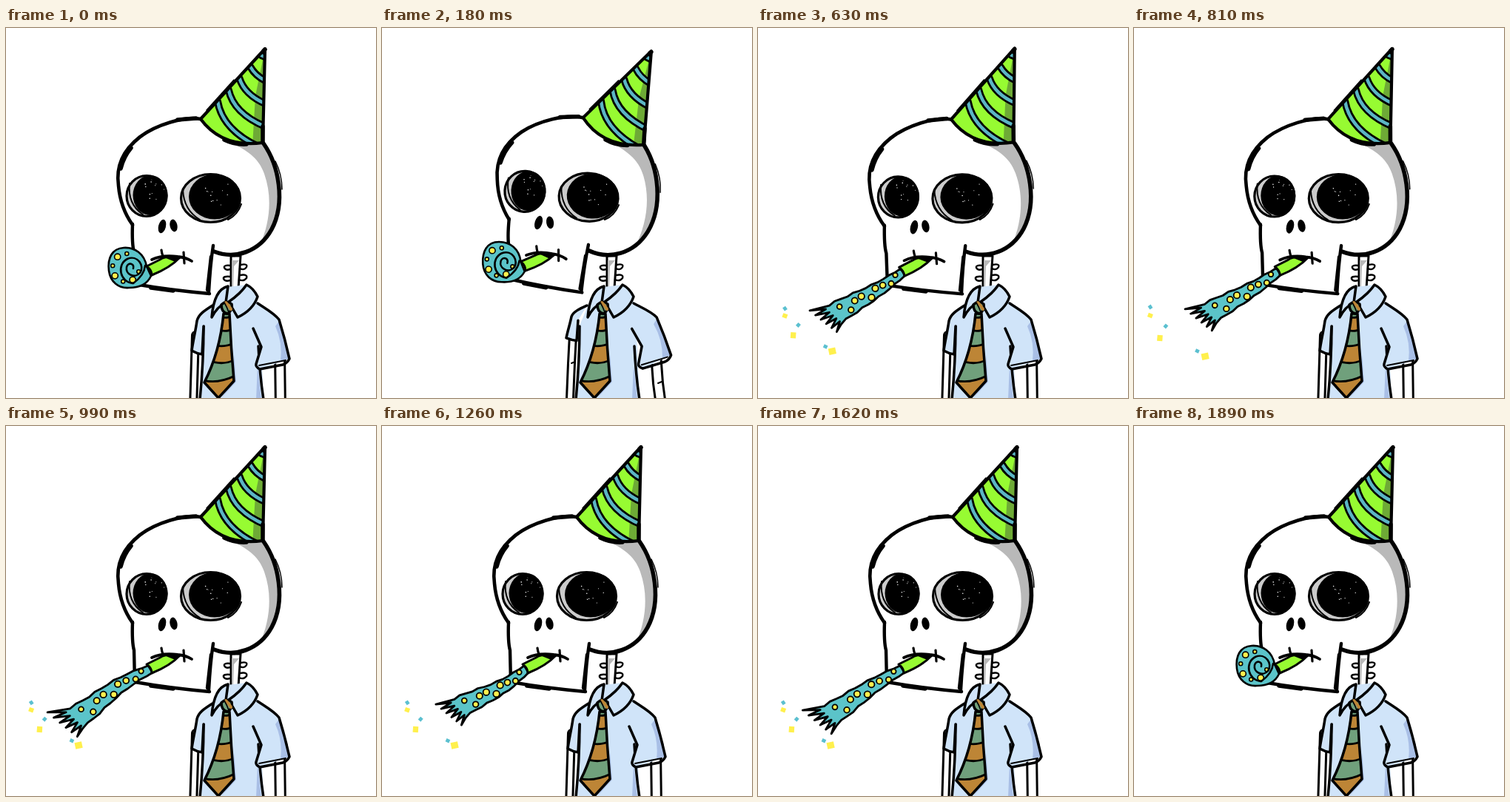
These frames come from a looping animation (500x500 px, 3.06 s). An HTML page:

```html
<!DOCTYPE html>
<html lang="en">
<head>
<meta charset="utf-8">
<title>Party skeleton</title>
<style>
  html, body { margin: 0; width: 100%; height: 100%; overflow: hidden; background: #fff; }
  svg { display: block; width: 100vw; height: 100vh; }
  .ink { fill: none; stroke: #000; stroke-linecap: round; stroke-linejoin: round; }
  .shirt { fill: #d0e4f9; } .shade { fill: #a9bfe6; stroke: none; }
  .bone { fill: #fff; } .gray { fill: #b9b9b9; stroke: none; }
  .green { fill: #97fb32; } .teal { fill: #5bc4c9; } .dot { fill: #fff04d; }
  #sleeveL path { vector-effect: non-scaling-stroke; }
</style>
</head>
<body>
<svg viewBox="0 0 500 500">
  <defs>
    <clipPath id="hatClip"><path id="hatShape" d="M350 28 L263 123 C277 142 302 161 347 155 Z"/></clipPath>
    <clipPath id="tieClip"><path id="tieShape" d="M294 386 Q289 438 268 479 L287 500 L308 477 Q304 432 302 386 Z"/></clipPath>
    <clipPath id="skullClip"><path id="skullShape" d="M263 123 C240 119 203 131 181 147 C154 168 149 192 152 213 C154 236 161 252 171 266 L174 346 L274 359 L280 302 C309 313 342 303 359 272 C378 236 369 186 348 156 Z"/></clipPath>
  </defs>

  <g class="ink" stroke-width="3">
    <path class="bone" d="M304 308 L304 352 L314 352 L317 308 Z"/>
    <path class="gray" d="M305 314 H315 L308 322 L307 350 H305 Z"/>
    <path stroke-width="2.4" d="M317 320 q10 -2 8 3 q-3 5 -9 2 M316 334 q11 -2 9 4 q-4 5 -10 2 M303 321 q-9 -1 -8 3 q2 4 8 2 M303 336 q-10 -1 -9 3 q2 4 9 2"/>
  </g>

  <g class="ink" stroke-width="3.5">
    <g id="armL"></g>
    <g id="armR"></g>
    <path class="shirt" stroke="none" d="M299 350 L278 376 L267 402 L262 502 H348 L345 432 L341 372 L325 347 Z"/>
    <path class="shade" d="M340 456 L345 502 H338 Z M308 440 L311 478 L291 500 L307 476 Z"/>
    <path d="M267 403 Q267 452 262 502 M341 430 Q343 470 348 502"/>
    <g id="sleeveL">
      <path class="shirt" d="M279 375 C268 382 260 387 258 396 C256 410 253 422 251 436 Q258 440 265 441 L267 403"/>
    </g>
    <g id="sleeveR">
      <path class="shirt" stroke="none" d="M340 372 L369 394 L383 447 L343 461 L338 454 L345 431 L334 406"/>
      <path class="shade" d="M369 396 L383 447 L371 450 Q374 425 364 403 Z"/>
      <path d="M340 372 C352 380 363 386 369 394 Q377 420 383 447 Q380 453 374 455 L343 461 Q337 458 338 454 L345 431 L334 406"/>
      <path stroke-width="2" d="M342 456 L378 449"/>
    </g>
    <g clip-path="url(#tieClip)">
      <path d="M260 380 H315 V502 H260 Z" fill="#70a07c" stroke="none"/>
      <g fill="#bd8536" stroke-width="2.8">
        <path d="M285 389 Q299 395 310 386 V404 Q299 413 285 407 Z"/>
        <path d="M275 427 Q294 434 312 424 V447 Q292 458 272 448 Z"/>
        <path d="M260 474 Q285 484 315 467 V504 H260 Z"/>
      </g>
    </g>
    <use href="#tieShape"/>
    <path class="shirt" d="M300 349 C287 352 280 366 278 391 Q285 377 297 371 Z"/>
    <path class="shirt" d="M301 370 L313 391 Q334 381 340 363 Q334 351 325 347 Q317 359 301 370 Z"/>
    <path fill="#70a07c" d="M291 374 Q298 367 305 373 Q307 382 299 386 Q291 384 291 374 Z"/>
    <path d="M297 371 Q302 376 304 380" stroke="#bd8536" stroke-width="4"/>
    <path d="M295 371 Q299 378 301 384" stroke-width="1.6"/>
  </g>

  <g id="head" class="ink">
    <use href="#skullShape" fill="#fff" stroke="none"/>
    <path class="gray" clip-path="url(#skullClip)" d="M296 151 C324 164 341 174 349 197 C360 228 357 262 343 294 L374 278 L382 190 L350 150 Z"/>
    <path stroke-width="4.6" d="M263 123 C240 119 203 131 181 147 C154 168 149 192 152 213 C154 236 161 252 171 266"/>
    <path stroke-width="5.6" d="M348 156 C369 186 378 236 359 272 C342 303 309 313 281 302"/>
    <path stroke-width="4.4" d="M171 265 Q170 292 173 303 L174 346 Q220 354 275 359"/>
    <path stroke-width="4.4" d="M280 294 Q276 320 274 357 M277 309 L272 354"/>
    <path stroke-width="5.5" d="M232 124 L257 122 M196 351 L226 355 M155 190 Q159 174 169 162"/>
    <path stroke-width="1.5" d="M364 180 Q373 198 373 218 M157 178 Q170 153 202 135 M158 238 Q162 254 169 261"/>

    <g id="eyes">
      <ellipse cx="190" cy="227" rx="27" ry="27.5" fill="#ccc" stroke-width="3.2"/>
      <ellipse cx="195" cy="226" rx="23.5" ry="27" fill="#000" stroke="none"/>
      <path d="M167 210 Q164 238 185 252" stroke-width="2"/>
      <ellipse cx="276.5" cy="230" rx="40" ry="32.5" fill="#ccc" stroke-width="3.2"/>
      <ellipse cx="282" cy="228" rx="35" ry="30.5" fill="#000" stroke="none"/>
      <path d="M239 218 Q240 246 262 259 M300 259 Q313 253 318 238" stroke-width="2"/>
    </g>
    <ellipse cx="211" cy="268" rx="5" ry="9.5" transform="rotate(14 211 268)" fill="#000" stroke="none"/>
    <ellipse cx="226.5" cy="267" rx="5" ry="8.5" transform="rotate(-12 226.5 267)" fill="#000" stroke="none"/>

    <g clip-path="url(#hatClip)">
      <path class="green" stroke="none" d="M255 20 H360 V165 H255 Z"/>
      <path fill="#6eaa36" stroke="none" d="M350 28 L337 92 L333 160 H350 Z"/>
      <g id="stripes"></g>
    </g>
    <use href="#hatShape" stroke-width="4.2"/>
    <path stroke-width="5.5" d="M348 31 L350 29 M347 133 L347 153 M295 151 Q309 158 325 157"/>
    <path stroke-width="1.5" d="M271 111 L308 70"/>

    <path stroke-width="3.8" d="M197 313 Q212 306 232 309 Q243 310 251 315"/>
    <path stroke-width="3.2" d="M210 300 Q211 307 213 310 M240 303 L241 318"/>
    <g id="tube" stroke-width="2.8"></g>
    <g id="roll" stroke-width="2.6">
      <path class="teal" d="M190 322 C187 305 174 296 159 297 C143 298 137 311 139 328 C141 343 152 352 166 351 C181 351 191 346 196 335 Z"/>
      <g id="rollDots" stroke-width="1.6"></g>
      <path d="M171 345 C154 343 149 320 164 312 C178 306 188 322 181 331 C174 339 161 333 163 323 C165 316 174 318 172 325 M188 321 Q187 334 172 345"/>
    </g>
    <path class="green" stroke-width="3" d="M235 310 Q216 307 208 313 L190 322 Q197 327 197 334 Q222 324 235 310 Z"/>
    <path fill="#000" stroke-width="2" d="M214 309 L237 309 L229 315 Z"/>
  </g>
  <g id="confetti"></g>
</svg>
<script>
const $ = id => document.getElementById(id);
const STEP = 90, LOOP = 3060;
const DX = -.85, DY = .527;   // direction the horn points

const lerp = (a, b, k) => a + (b - a) * k;
const dot = (x, y, r) => `<circle class="dot" cx="${x}" cy="${y}" r="${r}"/>`;
const repeat = (n, make) => Array.from({ length: n }, (_, i) => make(i));

// Linear value between [step, value] keys
function keyed(step, keys) {
  const i = keys.findIndex(k => k[0] > step);
  if (i < 1) return i ? keys.at(-1)[1] : keys[0][1];
  const [a, b] = [keys[i - 1], keys[i]];
  return lerp(a[1], b[1], (step - a[0]) / (b[0] - a[0]));
}

$('stripes').innerHTML = repeat(5, i => {
  const x = 286 + 14.75 * i, y = 99 - 15.5 * i, end = 165 - 31 * i;
  const d = `M${x} ${y} Q${x + 7} ${lerp(y, end, .64)} 352 ${end}`;
  return `<path d="${d}" stroke-width="10"/><path d="${d}" stroke="#5bb5c4" stroke-width="4.5"/>`;
}).join('');

$('rollDots').innerHTML = repeat(7, i => {
  const a = -1.5 - .75 * i;
  return dot(162 + 18 * Math.cos(a), 324 + 19 * Math.sin(a), 2.5 + 1.6 * (i % 2));
}).join('');

let seed = 7;
const rnd = () => (seed = seed * 16807 % 2147483647) / 2147483647;
function specks(cx, cy, rx, ry) {
  return repeat(12, () => {
    const a = rnd() * 6.28, r = Math.sqrt(rnd());
    return `<circle cx="${cx + rx * r * Math.cos(a)}" cy="${cy + ry * r * Math.sin(a)}" r="${.4 + rnd() * .4}" fill="#fff" stroke="none"/>`;
  }).join('');
}
$('eyes').insertAdjacentHTML('beforeend', specks(200, 218, 14, 16) + specks(288, 222, 23, 18));

function drawArm(id, width, top, elbow, hand) {
  const d = `M${top} L${elbow} L${hand}`;
  $(id).innerHTML = `<path d="${d}" stroke-width="${width}"/>` +
    `<path d="${d}" stroke="#fff" stroke-width="${width - 6}"/>` +
    `<path d="M${elbow} l5 -2" stroke-width="2"/>`;
}

function drawTube(len, bend, torn) {
  const at = (u, v) => {
    const s = len * u, w = v * (5.5 + 10 * u * len / 115) + bend * Math.sin(u * 4.7);
    return [195 + DX * s + DY * w, 328.5 + DY * s - DX * w];
  };
  const side = v => repeat(13, i => at(i / 12, v + .08 * Math.sin(i * 2.2)));
  const fringe = repeat(11, i => {
    const v = i / 5 - 1;
    return i % 2 ? at(1.03 - .04 * v, v) : at(1.17 - .07 * v, v * 1.35);
  });
  const pts = [...side(-1), ...(torn ? fringe : []), ...side(1).reverse()];
  const dots = repeat(9, i => {
    const u = .1 + .1 * i;
    return dot(...at(u, .5 * Math.sin(i * 2.2 - 1)), 2.8 + 1.5 * Math.sin(u * 3));
  });
  $('tube').innerHTML = `<path class="teal" d="M${pts.map(p => p.map(n => n.toFixed(1))).join('L')}Z"/>` +
    `<g stroke-width="1.8">${dots.join('')}</g>`;
}

// Yellow and blue bits fly out in repeated short bursts
function drawConfetti(step, tilt) {
  const spread = 1 + .08 * Math.floor(step % 3.5);
  const bits = [[34, 384], [34, 374], [45, 410], [52, 396], [98, 431], [89, 425]];
  $('confetti').innerHTML = step < 6 || step > 20 ? '' : bits.map(([x, y], i) => {
    const px = lerp(115, x, spread) - 3 * tilt, py = lerp(365, y, spread) - 7 * tilt;
    const r = i % 2 ? 2.6 : 3.2 + .4 * i;
    return `<rect x="${-r}" y="${-r}" width="${2 * r}" height="${1.8 * r}" fill="${i % 2 ? '#5bc0d0' : '#fff04d'}" transform="translate(${px} ${py}) rotate(${20 + i * 37})"/>`;
  }).join('');
}

function draw(step) {
  const tilt = keyed(step, [[0, 0], [2, 3.25], [4, 3.25], [6, -1], [10, 0]]);
  const lift = Math.max(0, tilt / 3.25);
  const flutter = Math.cos((step - 11) * Math.PI / 3);
  const len = keyed(step, [[4, 0], [6, 1], [18, 1], [21, 0]]) * (112 + 8 * flutter);
  const rolled = len < 70;

  $('head').setAttribute('transform', `rotate(${tilt} 300 275)`);
  $('sleeveL').setAttribute('transform', `translate(${-2 * lift} ${375 * .28 * lift}) scale(1 ${1 - .28 * lift})`);
  $('sleeveR').setAttribute('transform', `rotate(${-6 * lift} 340 372)`);
  drawArm('armL', 12, [lerp(256, 258, lift), 415], [lerp(253, 256, lift), lerp(515, 453, lift)], [253, 525]);
  drawArm('armR', 16, [370, 440], [lerp(371, 373, lift), lerp(515, 480, lift)], [lerp(372, 379, lift), 525]);

  $('roll').style.display = rolled ? '' : 'none';
  $('roll').setAttribute('transform', `translate(${194 + DX * len} ${328 + DY * len}) scale(${1 - len / 150}) translate(-194 -328)`);
  if (len) drawTube(len, -3 * flutter, !rolled);
  else $('tube').innerHTML = '';
  drawConfetti(step, tilt);
}

let shown = -1;
const t0 = performance.now();
function tick() {
  const step = Math.floor((performance.now() - t0) % LOOP / STEP);
  if (step !== shown) draw(shown = step);
  requestAnimationFrame(tick);
}
tick();
</script>
</body>
</html>
```
